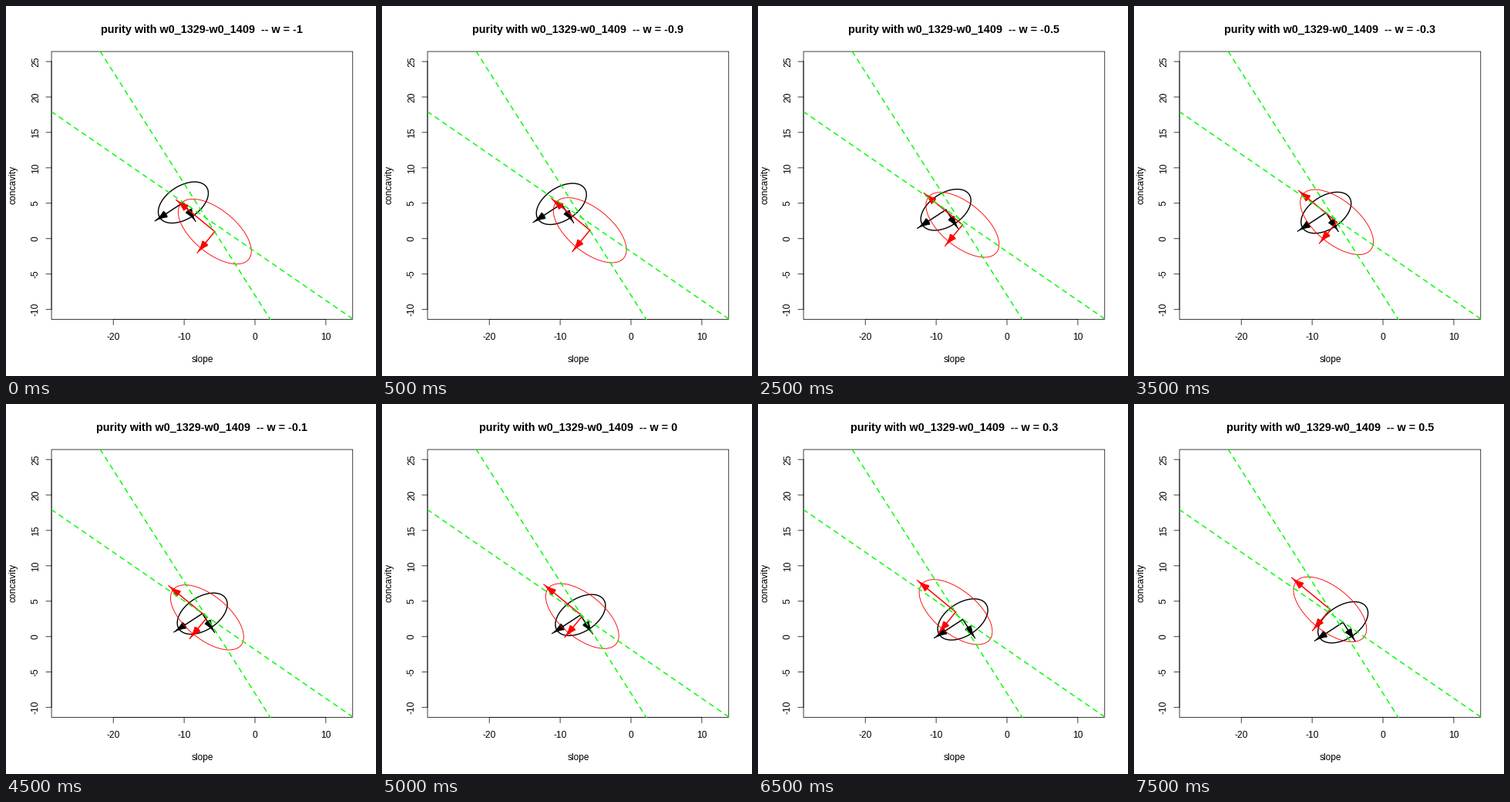
Animation of 480x480 px, one loop 8 s. Source, as a matplotlib script:

```python
import numpy as np
import matplotlib.pyplot as plt
from matplotlib.animation import FuncAnimation
from matplotlib.patches import Polygon, Rectangle

SIZE, DPI = 480, 72          # at 72 dpi one point is one pixel
FRAMES, INTERVAL = 16, 500
LEFT, TOP, RIGHT, BOTTOM = 59.04, 59.04, 449.76, 406.56
THIN, THICK = 0.75, 1.5
HEAD_LEN, HEAD_HALF = 16.4, 4.5
GREEN = "#00ff00"

plt.rcParams["font.family"] = "Liberation Sans"
fig = plt.figure(figsize=(SIZE / DPI, SIZE / DPI), dpi=DPI, facecolor="white")
ax = fig.add_axes([0, 0, 1, 1])
ax.set(xlim=(0, SIZE), ylim=(SIZE, 0))
ax.axis("off")


def px(x):
    return 323.0 + 9.19 * x


def py(y):
    return 301.8 - 9.19 * y


def label(x, y, text, size=12, **kw):
    return ax.text(x, y, text, fontsize=size, ha="center", va="baseline",
                   rotation_mode="anchor", **kw)


def rule(xs, ys):
    ax.plot(xs, ys, "k", lw=THIN, snap=False, zorder=1,
            solid_capstyle="round")


def draw_frame():
    ax.add_patch(Rectangle((LEFT, TOP), RIGHT - LEFT, BOTTOM - TOP, snap=False,
                           fill=False, lw=THIN, ec="black", zorder=1))
    # axis lines run over the box between the outermost ticks
    rule([px(-20), px(10)], [BOTTOM] * 2)
    rule([LEFT] * 2, [py(-10), py(25)])
    for v in range(-20, 11, 10):
        rule([px(v)] * 2, [BOTTOM, BOTTOM + 7.2])
        label(px(v), 433, str(v))
    for v in range(-10, 26, 5):
        rule([LEFT, LEFT - 7.2], [py(v)] * 2)
        label(42, py(v), str(v), rotation=90)
    label(254.4, 462, "slope")
    label(13, 231.8, "concavity", rotation=90)


def draw_guides():
    clip = Rectangle((LEFT, TOP), RIGHT - LEFT, BOTTOM - TOP,
                     transform=ax.transData)
    for xs, ys in (((122.3, 342.9), (59, 406.6)),
                   ((59, 449.8), (137.1, 405.9))):
        line, = ax.plot(xs, ys, color=GREEN, lw=THICK, ls=(0, (4, 4)),
                        dash_capstyle="round", zorder=5)
        line.set_clip_path(clip)


def head_shape():
    """Arrowhead along +x, centred on the origin: concave sides, rounded back."""
    t = np.linspace(0, np.pi / 4, 12)
    x = HEAD_LEN * (0.5 - np.sin(t) / np.sin(t[-1]))
    arc = (1 - np.cos(t)) / (1 - np.cos(t[-1]))
    y = HEAD_HALF * (0.7 * arc + 0.3 * (0.5 - x / HEAD_LEN))
    s = np.linspace(np.pi / 2, 3 * np.pi / 2, 12)
    back = np.c_[x[-1] + 0.25 * HEAD_HALF * np.cos(s), HEAD_HALF * np.sin(s)]
    return np.vstack([np.c_[x, y], back, np.c_[x, -y][::-1]])


HEAD = head_shape()


class Cluster:
    """An ellipse with arrows along its two semi-axes, drifting linearly."""

    def __init__(self, color, lw, start, step, major, minor, z):
        self.start, self.step = np.array(start), np.array(step)
        self.axes = [np.array(major), np.array(minor)]
        t = np.linspace(0, 2 * np.pi, 181)[:, None]
        self.outline = np.cos(t) * self.axes[0] + np.sin(t) * self.axes[1]
        self.ring, = ax.plot([], [], color=color, lw=lw, zorder=z)
        self.shafts = [ax.plot([], [], color=color, lw=THICK, zorder=z)[0]
                       for _ in self.axes]
        self.heads = [ax.add_patch(Polygon(HEAD, fc=color, ec=color, lw=THIN,
                                           zorder=z)) for _ in self.axes]

    def place(self, i):
        c = self.start + i * self.step
        self.ring.set_data(*(c + self.outline).T)
        for v, shaft, head in zip(self.axes, self.shafts, self.heads):
            end = c + v
            shaft.set_data(*np.array([c, end]).T)
            u = v / np.hypot(*v)
            head.set_xy(end + HEAD @ np.array([u, [-u[1], u[0]]]))


def polar(r, x, y):
    return r * np.array([x, y]) / np.hypot(x, y)


draw_frame()
draw_guides()
title = label(254.4, 35, "", 14.4, weight="bold")
clusters = [
    Cluster("black", 1.4, (230.0, 254.9), (2.74, 1.89),
            polar(36.2, -36, 23.5), polar(21.4, 15.5, 23.8), 3),
    Cluster("red", 0.9, (270.8, 292.6), (-1.1, -1.75),
            polar(56.9, -49, -40.3), polar(28.1, -22.6, 27.5), 4),
]


def update(i):
    w = (i - 10) / 10
    title.set_text(f"purity with w0_1329-w0_1409  -- w = {w:g}")
    for c in clusters:
        c.place(i)
    return []


anim = FuncAnimation(fig, update, frames=FRAMES, interval=INTERVAL,
                     init_func=lambda: update(0), repeat=True, repeat_delay=0)
plt.show()
```
